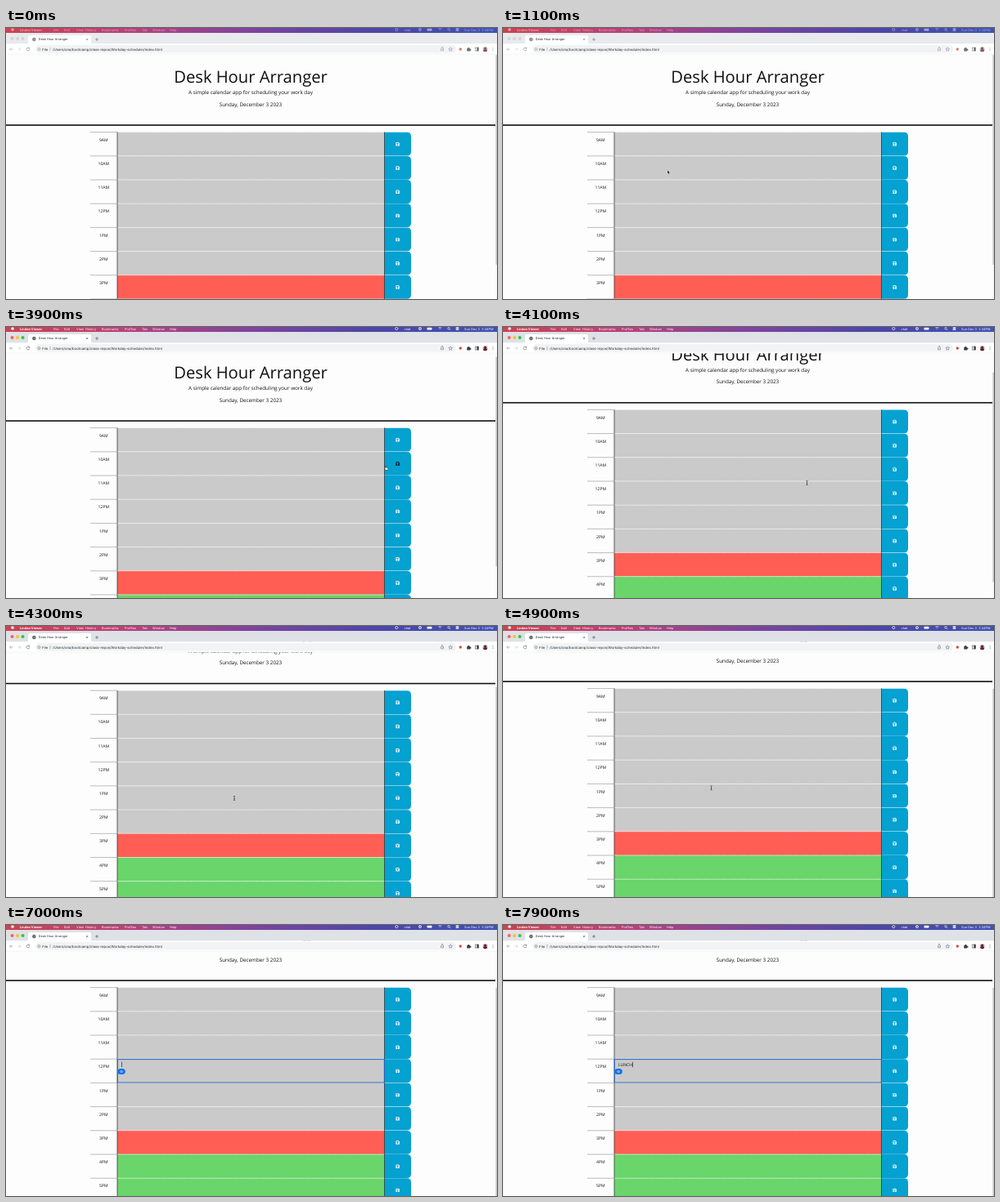
Recreate the animation shown at these times as an HTML page. Size 600 px wide and 332 px high, loop 8 s.

```html
<!DOCTYPE html>
<html lang="en">
<head>
<meta charset="utf-8">
<title>Desk Hour Arranger</title>
<style>
html, body { margin: 0; width: 100%; height: 100%; overflow: hidden; background: #fdfdfe; }
svg { display: block; width: 600px; height: 332px; }
text { text-rendering: geometricPrecision; white-space: pre; }
.page { font-family: "Open Sans", sans-serif; fill: #111; }
.ui { font-family: Inter, Roboto, sans-serif; }
.mid { text-anchor: middle; }
</style>
</head>
<body>
<svg viewBox="0 0 600 332">
  <defs>
    <linearGradient id="bar">
      <stop offset="0" stop-color="#cb4351"/>
      <stop offset=".25" stop-color="#b8427a"/>
      <stop offset=".5" stop-color="#7f439f"/>
      <stop offset=".75" stop-color="#4d46a8"/>
      <stop offset="1" stop-color="#4052b0"/>
    </linearGradient>
    <path id="disk" fill-rule="evenodd" d="M-2.2-1.7q0-.5.5-.5H1.2L2.2-1.2V1.7q0 .5-.5.5H-1.7q-.5 0-.5-.5ZM-1.4-1.5V-.3H1V-1.5ZM0 .1A.75.75 0 1 0 .01.1Z"/>
  </defs>

  <g id="page" class="page">
    <text class="mid" x="299" y="67" font-size="20.2">Desk Hour Arranger</text>
    <text class="mid" x="299" y="81.2" font-size="6.31">A simple calendar app for scheduling your work day</text>
    <text class="mid" x="299" y="95.6" font-size="6.31">Sunday, December 3 2023</text>
    <rect y="118.2" width="598" height="1.6"/>
    <g id="rows"></g>
    <g id="focus">
      <rect x="136.3" y="215.6" width="326" height="28.4" fill="none" stroke="#2466c4"/>
      <text id="typed" x="141" y="224.2" font-size="5.05"></text>
      <rect id="caret" y="218.8" width=".6" height="6.4"/>
      <g id="caps">
        <rect x="136.4" y="226.9" width="9.4" height="7" rx="3.5" fill="#1473e6"/>
        <path d="M139.6 230.6l1.5-1.6 1.5 1.6h-.8v1h-1.4v-1Z" fill="none" stroke="#fff" stroke-width=".5"/>
      </g>
    </g>
  </g>

  <rect x="598" y="32" width="2" height="300" fill="#f8f8f8"/>
  <rect id="thumb" x="598.5" width="1.3" height="257" rx=".6" fill="#bdbdbd"/>

  <g class="ui">
    <rect width="600" height="6" fill="url(#bar)"/>
    <g id="menu" fill="#fff" font-size="3.9">
      <circle cx="8" cy="2" r="1.8"/>
      <circle cx="477.3" cy="2" r="1.6" fill="none" stroke="#fff" stroke-width=".7"/>
      <circle cx="506" cy="2" r="1.6" fill="none" stroke="#fff" stroke-width=".7"/>
      <path d="M505.4 1l1.6 1-1.6 1Z"/>
      <rect x="514.5" y=".7" width="6" height="2.8" rx=".7"/>
      <path d="M528.4 1q2-1.8 4 0M529.3 2q1.1-.9 2.2 0M530.4 3v.4" fill="none" stroke="#fff" stroke-width=".6"/>
      <circle cx="541" cy="1.7" r="1.3" fill="none" stroke="#fff" stroke-width=".6"/>
      <path d="M542 2.7l1.3 1.3" stroke="#fff" stroke-width=".6"/>
      <rect x="549.5" y=".2" width="4" height="1.5" rx=".7"/>
      <rect x="549.5" y="2.3" width="4" height="1.5" rx=".7"/>
    </g>
    <rect id="strip" y="6" width="600" height="13.5"/>
    <g id="lights"><circle cx="7.5" cy="13" r="2"/><circle cx="14" cy="13" r="2"/><circle cx="20.5" cy="13" r="2"/></g>
    <path d="M25 19.5q2 0 2-2V11q0-2 2-2H102q2 0 2 2v6.5q0 2 2 2Z" fill="#fff"/>
    <rect y="19.3" width="600" height="12.9" fill="#fff"/>
    <rect y="31.8" width="600" height=".4" fill="#e2e3e5"/>
    <rect x="36" y="21" width="514" height="9.6" rx="4.8" fill="#f1f3f4"/>
    <g id="tools" fill="none" stroke="#505357" stroke-width=".6">
      <circle cx="34.3" cy="14" r="1.9" fill="#505357"/>
      <path d="M32.5 14h3.6M34.3 12.1v3.8" stroke="#ddd" stroke-width=".3"/>
      <path d="M98 12.8l2.2 2.2m0-2.2L98 15M109 14h4M111 12v4"/>
      <path d="M8.5 26H4.7l1.7-1.8M4.7 26l1.7 1.8" stroke="#8a8d91"/>
      <path d="M14.3 26h3.8l-1.7-1.8M18.1 26l-1.7 1.8" stroke="#c4c6c9"/>
      <path d="M28.4 24.7a1.9 1.9 0 1 0 .4 1.7M28.7 23.8v1.3h-1.4"/>
      <circle cx="40.4" cy="26" r="1.6" stroke-width=".45"/>
      <path d="M40.4 25.8v1M40.4 25v.3M54 23.8v4.4" stroke-width=".4"/>
      <path d="M531.5 25v2.8h3V25h-.7M533 26.6v-3.4m-1 1l1-1 1 1" stroke-width=".45"/>
      <path d="M543.3 23.7l.7 1.6 1.7.1-1.3 1.1.4 1.7-1.5-.9-1.5.9.4-1.7-1.3-1.1 1.7-.1Z" stroke-width=".45"/>
      <circle cx="555.3" cy="26" r="1.7" fill="#e0453d" stroke="none"/>
      <path d="M563.3 24.8h1.3a.8.8 0 1 1 1.5 0h1.2v1.2a.8.8 0 1 1 0 1.4v1h-4Z" fill="#3c4043" stroke="none"/>
      <rect x="573.4" y="24" width="4" height="4"/>
      <path d="M575.6 24h1.8v4h-1.8Z" fill="#3c4043"/>
      <circle cx="585.6" cy="26" r="3" fill="#c9a3a0" stroke="none"/>
      <path d="M583 27.7q.5-1.4 1.7-1.5a1.5 1.5 0 1 1 1.8 0q1.2.2 1.7 1.5a3 3 0 0 1-5.2 0Z" fill="#58252d" stroke="none"/>
      <path d="M595 24.2v.7M595 25.7v.7M595 27.2v.7" stroke-width=".8"/>
    </g>
    <g fill="#26282b">
      <text x="39.8" y="15.4" font-size="3.8">Desk Hour Arranger</text>
      <text x="44.2" y="27.5" font-size="4.2">File</text>
      <text x="57" y="27.5" font-size="4.3">/Users/ona/bootcamp/class-repos/Workday-scheduler/index.html</text>
    </g>
  </g>

  <g id="cursor" stroke-linejoin="round">
    <path id="arrow" d="M0-1.5V3.3L1.1 2.3 1.9 4 2.7 3.6 1.9 2H3.3Z" fill="#111" stroke="#fff" stroke-width=".4"/>
    <path id="beam" d="M-1-2.6q1 0 1 .7 0-.7 1-.7M0-1.9V1.9M-1 2.6q1 0 1-.7 0 .7 1 .7M-.6.7h1.2" fill="none" stroke="#222" stroke-width=".6"/>
    <path id="hand" d="M-.5-1q.5-.7 1 0V1l2 .4q.6.2.5.9L2.6 4.5H0L-1.7 2.2q0-.8.7-.5l.5.5Z" fill="#fff" stroke="#111" stroke-width=".5"/>
  </g>
</svg>

<script>
const $ = id => document.getElementById(id);
const TOP = 127.5, PITCH = 29.2, LOOP = 8000;
const hours = ["9AM", "10AM", "11AM", "12PM", "1PM", "2PM", "3PM", "4PM", "5PM"];
const slotColor = i => i < 6 ? "#cacaca" : i === 6 ? "#ff5e55" : "#69d56b";

$("rows").innerHTML = hours.map((hour, i) => `
  <g transform="translate(0 ${TOP + i * PITCH})">
    <rect x="136" width="326.5" height="${PITCH}" fill="${slotColor(i)}"/>
    <path d="M136 .1H462" stroke="#fff" stroke-width=".7" stroke-dasharray="1.6 .6"/>
    <path d="M103 .1h33" stroke="#333" stroke-width=".55" stroke-dasharray=".6 .4"/>
    <path d="M462.5 .2H490q5 0 5 5V24q0 5-5 5H462.5Z" fill="#05a1d1"/>
    <path d="M136 0v${PITCH}M462.5 0v${PITCH}" stroke="#222" stroke-width=".7"/>
    <text class="mid" x="119.3" y="11.3" font-size="5.05">${hour}</text>
    <use class="icon" href="#disk" x="478.6" y="14.8"/>
  </g>`).join("");
const icons = [...document.querySelectorAll(".icon")];

const menuItems = [[58, "File"], [71, "Edit"], [86, "View"], [97, "History"], [117, "Bookmarks"],
  [145, "Profiles"], [166, "Tab"], [179, "Window"], [200, "Help"], [486.5, "chat"], [560, "Sun Dec 3  3:34PM"]];
$("menu").innerHTML += `<text x="17" y="3.5" font-weight="700">Linden Viewer</text>` +
  menuItems.map(([x, s]) => `<text x="${x}" y="3.5">${s}</text>`).join("");

const pointer = [[500, 60, 345], [1100, 201, 175.5], [1900, 300, 190], [2800, 390, 152.5], [3400, 479, 168],
  [3900, 464, 171], [4300, 279, 211], [5100, 250, 196], [6000, 157, 175], [6600, 150, 178]];
const scrolling = [[3800, 0], [3900, 4], [4300, 48.5], [4500, 51]];
const strokes = [7200, 7400, 7600, 7700, 7900];

const linear = p => p, smooth = p => p * p * (3 - 2 * p);
function at(keys, t, ease) {
  const n = keys.findIndex(k => k[0] > t);
  if (n < 0) return keys.at(-1).slice(1);
  if (n === 0) return keys[0].slice(1);
  const a = keys[n - 1], b = keys[n], p = ease((t - a[0]) / (b[0] - a[0]));
  return a.slice(1).map((v, i) => v + (b[i + 1] - v) * p);
}
const show = (id, on) => $(id).setAttribute("visibility", on ? "inherit" : "hidden");

function draw(t) {
  const active = t >= 2000, focused = t >= 6500;
  const [scroll] = at(scrolling, t, linear);
  const [x, y] = at(pointer, t, smooth);

  $("page").setAttribute("transform", `translate(0 ${-scroll})`);
  $("thumb").setAttribute("y", 33 + scroll * 0.86);

  $("menu").setAttribute("opacity", active ? 0.95 : 0.5);
  $("tools").setAttribute("opacity", active ? 1 : 0.75);
  $("strip").setAttribute("fill", active ? "#dee1e6" : "#e8eaed");
  ["#fe5f57", "#febc2e", "#28c840"].forEach((c, i) =>
    $("lights").children[i].setAttribute("fill", active ? c : "#d2d4d7"));

  const onButton = active && x > 462.5 && x < 495;
  const onSlot = active && x > 136 && x <= 462.5 && y > TOP - scroll;
  const row = Math.floor((y - TOP + scroll) / PITCH);
  icons.forEach((icon, i) => icon.setAttribute("fill", onButton && i === row ? "#111" : "#fff"));
  $("cursor").setAttribute("transform", `translate(${x} ${y})`);
  show("cursor", t >= 500 && t < 7000);
  show("beam", onSlot);
  show("hand", onButton);
  show("arrow", !onSlot && !onButton);

  show("focus", focused);
  show("caps", t >= 7000);
  $("typed").textContent = "LUNCH".slice(0, strokes.filter(s => s <= t).length);
  $("caret").setAttribute("x", 141.2 + $("typed").getComputedTextLength());
}

function frame() {
  draw(Math.floor(performance.now() % LOOP / 100) * 100);
  requestAnimationFrame(frame);
}
frame();
</script>
</body>
</html>
```
